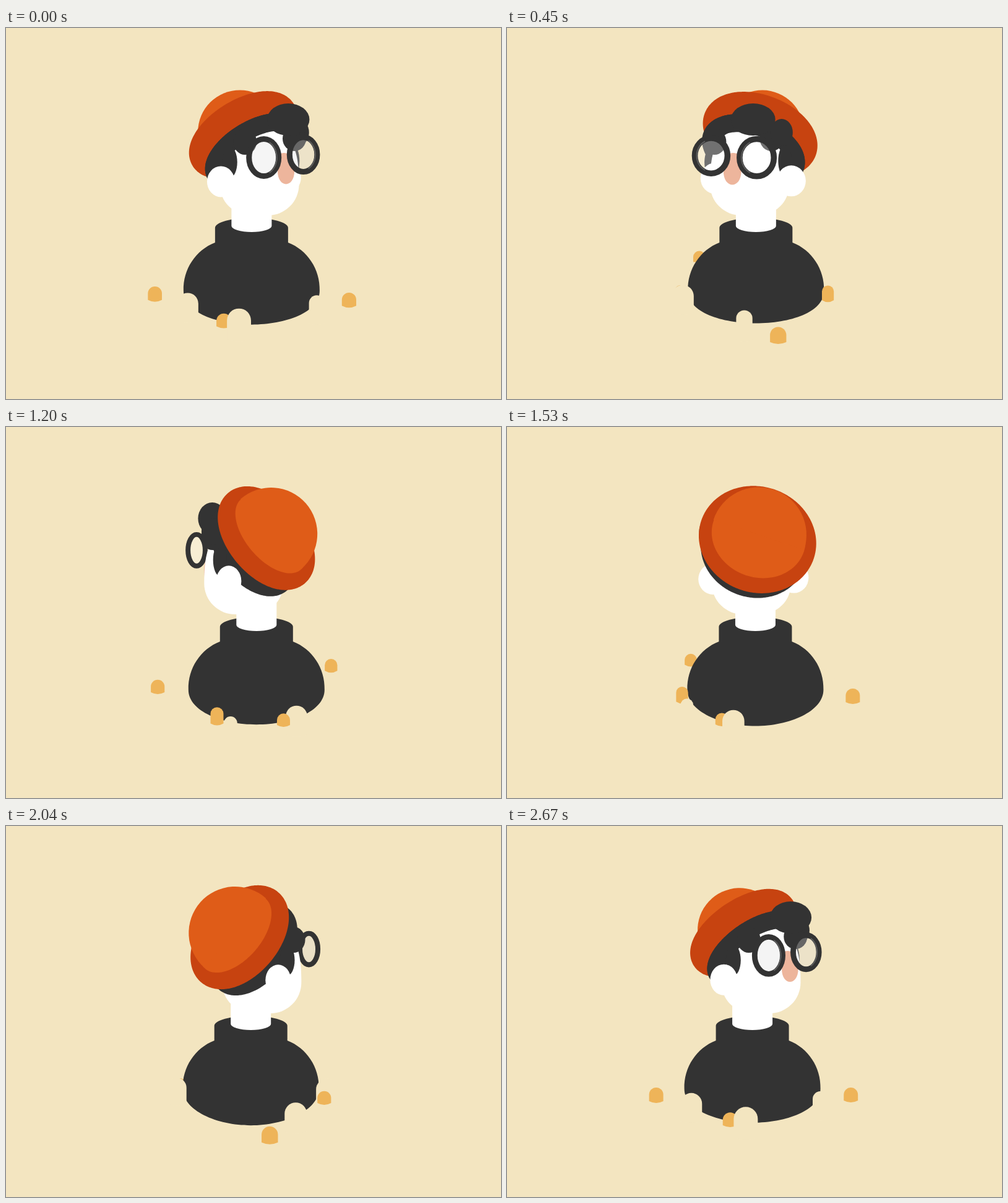
An HTML page with a canvas that plays this animation: 800x600 px, repeating every 2700 ms.

```html
<!DOCTYPE html>
<html lang="en">
<head>
<meta charset="utf-8">
<title>Turning bust</title>
<style>
  html, body { margin: 0; width: 100%; height: 100%; overflow: hidden; background: #f3e5c0; }
  canvas { display: block; }
</style>
</head>
<body>
<canvas id="stage" width="800" height="600"></canvas>
<script>
const ctx = document.getElementById('stage').getContext('2d');
const LOOP = 2700, STEP = 30, RAD = Math.PI / 180, AXIS = 399;
const SAND = '#f3e5c0', DARK = '#333', SKIN = '#fff', NOSE = '#edb59c';
const BAND = '#c74310', DOME = '#df5c18', GOLD = '#eeb459';

// Pegs circling the bust: angle, radius, width, rise above centre, drop below, colour
const pegs = [
  [-80, 157, 22, 12, 12, GOLD], [72, 154, 22, 11.5, 11.5, GOLD],
  [-21, 118, 21, 10, 11, GOLD], [134, 119, 18.5, 16, 10, GOLD], [181, 119, 18.5, 9, 10, GOLD],
  [-10, 118, 34, 20, 26, SAND], [-57, 118, 32, 18.5, 26, SAND], [53, 118, 23, 18, 26, SAND],
  [-170, 123, 31, 18, 26, SAND], [144, 118, 19, 6, 26, SAND]
];

// Locks of hair: side, forward, y, width radius, height radius, extra width when facing the viewer
const locks = [
  [-64, 23, 217, 12, 25, 0], [64, 22, 215, 11, 26, 0],
  [-50, 45, 184, 19, 21, 0], [50, 45, 179, 19, 20, 0],
  [64, 36, 169, 18, 22, 0], [25, 62, 148, 23, 26, 14]
];

let sin, cos;

function place(side, forward, y, tilt = 0) {
  const depth = forward * cos - side * sin;
  return { x: AXIS + side * cos + forward * sin, y: y + tilt * depth, depth };
}

function fill(color, trace) {
  ctx.beginPath();
  trace();
  ctx.fillStyle = color;
  ctx.fill();
}

const oval = (color, x, y, rx, ry) => fill(color, () => ctx.ellipse(x, y, rx, ry, 0, 0, 7));

function drawPeg({ x, y, scale, width, rise, drop, color }) {
  const r = width * scale / 2, top = y - rise * scale, base = y + drop * scale;
  fill(color, () => {
    ctx.moveTo(x - r, base - 3);
    ctx.lineTo(x - r, top + r);
    ctx.arc(x, top + r, r, Math.PI, 0);
    ctx.lineTo(x + r, base - 3);
    ctx.quadraticCurveTo(x, base + 3, x - r, base - 3);
  });
}

function layPegs(turn) {
  return pegs.map(([angle, radius, width, rise, drop, color]) => {
    const a = (angle + turn) * RAD, near = radius * Math.cos(a) / 157;
    const scale = 1 / (1 - 0.17 * near);
    return {
      x: 400 + radius * Math.sin(a) * scale, y: 288 + (130 + 47 * near) * scale,
      near, scale, width, rise, drop, color
    };
  }).sort((a, b) => a.near - b.near);
}

function drawBody(yaw) {
  const x = 400.2 - 5.5 * sin, base = 481 + 3.5 * Math.cos(yaw - 150 * RAD);
  fill(DARK, () => {
    ctx.moveTo(x - 59, 347);
    ctx.bezierCurveTo(x - 90, 359, x - 111, 390, x - 110, 425);
    ctx.bezierCurveTo(x - 110, 460, x - 55, base, x, base);
    ctx.bezierCurveTo(x + 55, base, x + 110, 460, x + 110, 425);
    ctx.bezierCurveTo(x + 111, 390, x + 90, 359, x + 59, 347);
    ctx.lineTo(x + 59, 322);
    ctx.ellipse(x, 323, 59, 16, 0, 0, Math.PI, true);
  });
  fill(SKIN, () => {
    ctx.rect(x - 32.5, 240, 65, 80);
    ctx.ellipse(x, 320, 32.5, 10, 0, 0, Math.PI);
  });
}

function drawFace() {
  const x = AXIS + 17.5 * sin;
  fill(SKIN, () => {
    ctx.moveTo(x, 163);
    ctx.bezierCurveTo(x + 54, 163, x + 64, 195, x + 64, 253);
    ctx.arc(x + 14, 253, 50, 0, Math.PI / 2);
    ctx.arc(x - 14, 253, 50, Math.PI / 2, Math.PI);
    ctx.bezierCurveTo(x - 64, 195, x - 54, 163, x, 163);
  });
}

function drawEar(side) {
  const p = place(67 * side, 3, 245, 0.08);
  oval(SKIN, p.x, p.y, 16 + 8 * Math.abs(cos), 25);
}

function drawNose() {
  const x = AXIS + 89 * sin, r = Math.max(3, 8 + 7 * cos);
  const top = x - 9 * sin * Math.abs(sin), base = 250 + 12 * Math.abs(cos);
  fill(NOSE, () => {
    ctx.moveTo(top, 202);
    ctx.bezierCurveTo(top + r, 202, x + r, 217, x + r, 231);
    ctx.bezierCurveTo(x + r, base, x - r, base, x - r, 231);
    ctx.bezierCurveTo(x - r, 217, top - r, 202, top, 202);
  });
}

function drawLens(side) {
  const p = place(40 * side, 82.5, 200.5, 0.1), flat = Math.abs(cos);
  const ry = 26 + 0.045 * p.depth, rx = ry * flat, tone = Math.min(255, 242 - 36 * sin);
  oval(flat < 0.25 ? DARK : `rgba(${tone},${tone},${tone},.3)`, p.x, p.y, rx, ry);
  ctx.beginPath();
  ctx.ellipse(p.x, p.y, rx, ry, 0, 0, 7);
  ctx.strokeStyle = DARK;
  ctx.lineWidth = 5.5 + 4.5 * flat;
  ctx.stroke();
  if (cos < 0.3) return;
  const mid = sin > 0 ? 0 : Math.PI;
  ctx.beginPath();
  ctx.ellipse(p.x, p.y, rx - 3, ry - 3, 0, mid - 1.1, mid + 1.1);
  ctx.strokeStyle = '#5c5c5c';
  ctx.lineWidth = 2;
  ctx.stroke();
}

function drawFeatures() {
  const nearSide = sin > 0 ? -1 : 1;
  drawNose();
  drawLens(-nearSide);
  drawLens(nearSide);
}

// Point on a ring that leans back with the hat; drop shifts it along the hat's axis
function ringPoint(a, radius, drop) {
  const up = Math.sin(a) * radius;
  return place(Math.cos(a) * radius, -26 + 0.77 * drop + 0.64 * up, 177 + 0.62 * drop - 0.75 * up, 0.2);
}

function ring(color, radius, drop, thick, nearOnly = false) {
  const centre = place(0, -26 + 0.77 * drop, 0).depth;
  ctx.beginPath();
  let drawing = false;
  for (let i = 0; i <= 240; i++) {
    const p = ringPoint(i * 3 * RAD, radius, drop);
    const shown = !nearOnly || p.depth >= centre;
    if (shown) ctx[drawing ? 'lineTo' : 'moveTo'](p.x, p.y);
    drawing = shown;
  }
  ctx.fillStyle = ctx.strokeStyle = color;
  ctx.lineWidth = thick;
  ctx.lineCap = ctx.lineJoin = 'round';
  if (!nearOnly) ctx.fill();
  if (thick) ctx.stroke();
}

const drawHair = nearOnly => ring(DARK, 72, 36, 29, nearOnly);
const drawBand = () => ring(BAND, 74, 0, 44);

function drawDome() {
  const p = place(0, -35, 171, 0.1), r = 72 + 0.15 * p.depth;
  const lean = Math.atan2(-0.62 - 0.1 * cos, -0.77 * sin);
  ring(DOME, r, -11, 0);
  fill(DOME, () => ctx.arc(p.x, p.y, r, lean - Math.PI / 2, lean + Math.PI / 2));
}

function drawLock([side, forward, y, rx, ry, widen]) {
  oval(DARK, place(side, forward, y).x, y, rx + widen * Math.max(0, cos), ry);
}

function drawHead() {
  const front = cos > 0.05;
  const inFront = lock => place(lock[0], lock[1], 0).depth >= 0;
  const earOnTop = side => place(67 * side, 3, 0).depth > 0 && cos > -0.85;

  locks.filter(lock => !inFront(lock)).forEach(drawLock);
  [-1, 1].filter(side => !earOnTop(side)).forEach(drawEar);
  if (front) {
    drawDome();
    drawBand();
    drawHair(false);
  } else {
    drawFeatures();
  }
  drawFace();
  drawHair(front);
  locks.filter(inFront).forEach(drawLock);
  [-1, 1].filter(earOnTop).forEach(drawEar);
  if (front) {
    drawFeatures();
  } else {
    drawBand();
    drawDome();
  }
}

function render(now) {
  const time = Math.floor(now % LOOP / STEP) * STEP;
  const turn = -360 * time / LOOP, yaw = (37 + turn) * RAD;
  sin = Math.sin(yaw);
  cos = Math.cos(yaw);
  ctx.fillStyle = SAND;
  ctx.fillRect(0, 0, 800, 600);
  const laid = layPegs(turn);
  laid.filter(peg => peg.near < 0).forEach(drawPeg);
  drawBody(yaw);
  drawHead();
  laid.filter(peg => peg.near >= 0).forEach(drawPeg);
}

let start;
function tick(now) {
  start ??= now;
  render(now - start);
  requestAnimationFrame(tick);
}
render(0);
requestAnimationFrame(tick);
</script>
</body>
</html>
```
